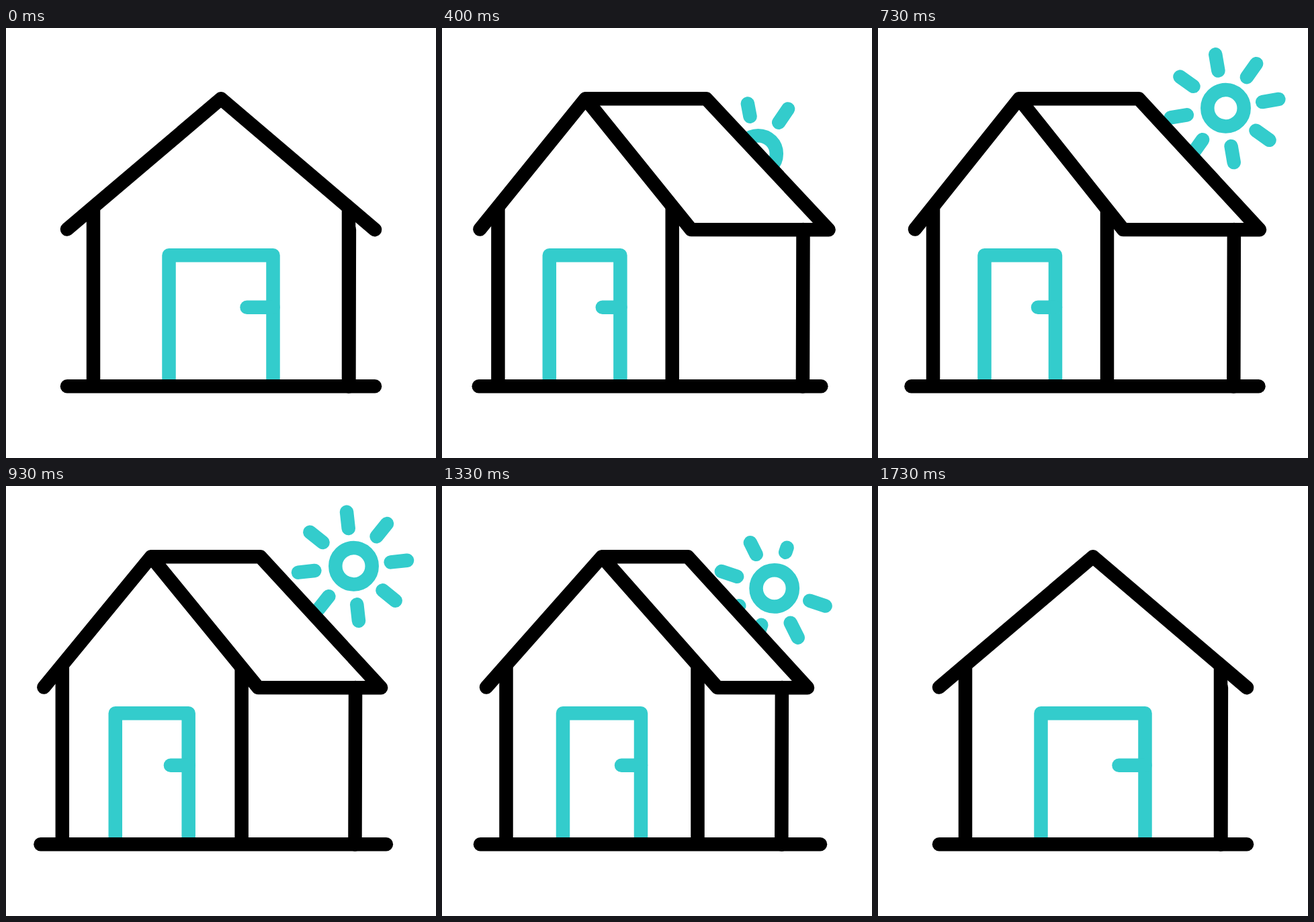
These frames come from a looping animation (640x640 px, 2 s). An HTML page:

```html
<!DOCTYPE html>
<html lang="en">
<head>
<meta charset="utf-8">
<title>House and sun</title>
<style>
  html, body { margin: 0; width: 100%; height: 100%; overflow: hidden; background: #fff; }
  svg { display: block; width: 100vw; height: 100vh; }
  path, circle { fill: none; stroke-width: 20.5; stroke-linecap: round; stroke-linejoin: round; }
  .ink { stroke: #000; }
  .teal { stroke: #33cccc; }
  .flat { stroke-linecap: butt; }
  #mask { fill: #fff; }
</style>
</head>
<body>
<svg viewBox="0 0 640 640">
  <circle id="disc" class="teal" r="27.2"/>
  <path id="rays" class="teal"/>
  <path id="mask"/>
  <path id="door" class="teal flat"/>
  <path id="knob" class="teal"/>
  <path id="walls" class="ink flat"/>
  <path id="backWall" class="ink"/>
  <path id="roof" class="ink"/>
  <path id="ground" class="ink"/>
</svg>
<script>
const LOOP = 2000, END = 52;
const TOP = 105.3, EAVE = 300, FLOOR = 533.2;

// x positions: at rest, fully turned, then at steps 22, 34 and 40
const tracks = {
  apex:     [320, 208, 210, 225.5, 238],
  eaveL:    [91, 54.6, 55, 59, 66],
  eaveR:    [549, 361.5, 365, 391, 410],
  backTop:  [320, 397, 388, 370, 366],
  backEave: [549, 577, 568, 549, 544],
  wallL:    [130, 81, 82, 87, 95.5],
  wallR:    [510, 334, 341, 363.5, 380.5],
  doorL:    [242.5, 155.5, 158.5, 169, 180],
  doorR:    [397.5, 258.5, 264, 282, 296],
  knob:     [358.5, 232.5, 238, 254, 267],
  groundL:  [91, 48.5, 49.5, 54, 57],
  groundR:  [549, 567, 566.5, 565, 563]
};
const spin = { at: [0, 12, 22, 34, 40, 50], deg: [-11, -10.7, -9.7, 0.5, 18.4, 50] };

const el = id => document.getElementById(id);
const clamp = v => Math.max(0, Math.min(1, v));
const ease = v => (1 - Math.cos(Math.PI * clamp(v))) / 2;
const mix = (a, b, k) => a + (b - a) * k;

// Monotone cubic through the points, flat at the start
function spline(ts, vs, t) {
  const last = ts.length - 1;
  if (t >= ts[last]) return vs[last];
  const slope = i => (vs[i + 1] - vs[i]) / (ts[i + 1] - ts[i]);
  const tangent = i => {
    if (i === 0) return 0;
    if (i === last) return slope(last - 1);
    const a = slope(i - 1), b = slope(i);
    return a * b > 0 ? 2 * a * b / (a + b) : 0;
  };
  let i = 0;
  while (t >= ts[i + 1]) i++;
  const h = ts[i + 1] - ts[i], u = (t - ts[i]) / h, w = 1 - u;
  return w * w * (1 + 2 * u) * vs[i] + u * u * (1 + 2 * w) * vs[i + 1]
    + h * u * w * (w * tangent(i) - u * tangent(i + 1));
}

function place(name, n) {
  const [rest, peak, a, b, c] = tracks[name];
  const turn = name.startsWith('ground') ? 16 : 14;
  if (n <= turn) return mix(rest, peak, ease(n / turn));
  return spline([turn, 22, 34, 40, 48, END], [peak, a, b, c, mix(rest, c, 1 / 3), rest], n);
}

const line = (...pts) => 'M' + pts.map(p => p.map(v => v.toFixed(2)).join(' ')).join('L');
const setPath = (id, d) => el(id).setAttribute('d', d);

function drawHouse(n) {
  const x = {};
  for (const name in tracks) x[name] = place(name, n);
  const back = x.backEave - 38.5;
  const apex = [x.apex, TOP], backTop = [x.backTop, TOP];
  const eaveL = [x.eaveL, EAVE - 0.5], eaveR = [x.eaveR, EAVE], backEave = [x.backEave, EAVE + 0.2];

  setPath('mask', line([x.wallL, FLOOR], eaveL, apex, backTop, backEave, [back, FLOOR]) + 'Z');
  setPath('door', line([x.doorL, FLOOR], [x.doorL, 348], [x.doorL, 338.3], [x.doorR, 338.3], [x.doorR, FLOOR]));
  setPath('knob', line([x.knob, 415.8], [x.doorR, 415.8]));
  setPath('walls', [x.wallL, x.wallR].map(w => line([w, 268], [w, FLOOR])).join(''));
  setPath('backWall', line([back + 0.4, EAVE], [back - 0.2, FLOOR + 0.3]));
  setPath('roof', line(eaveL, apex) + line(apex, backTop, backEave, eaveR) + 'Z');
  setPath('ground', line([x.groundL, FLOOR], [x.groundR, FLOOR]));
}

function drawSun(n) {
  const rise = ease((n - 4) / 14.4) - ease((n - 35.8) / 14.2);
  const cx = mix(404, 517.5, rise), cy = mix(284, 119.3, rise);
  el('disc').setAttribute('cx', cx);
  el('disc').setAttribute('cy', cy);

  const turn = spline(spin.at, spin.deg, n);
  let d = '';
  for (let i = 0; i < 8; i++) {
    const size = clamp((n - 9.4 - i) / 2) - clamp((n - 37.6 - i) / 2);
    if (size <= 0) continue;
    const a = (turn - 45 * (i + 1)) * Math.PI / 180;
    const point = r => [cx - 1.5 + r * Math.cos(a), cy + 0.4 + r * Math.sin(a)];
    d += line(point(57), point(57 + 24.5 * size));
  }
  setPath('rays', d);
}

// 30 steps a second, with step times rounded to 10 ms
function draw(ms) {
  const tick = Math.floor((ms % LOOP) / 10) * 10;
  const n = Math.min(END, Math.floor((tick + 5) * 0.03));
  drawSun(n);
  drawHouse(n);
}

const start = performance.now();
function loop() {
  draw(performance.now() - start);
  requestAnimationFrame(loop);
}
loop();
</script>
</body>
</html>
```
